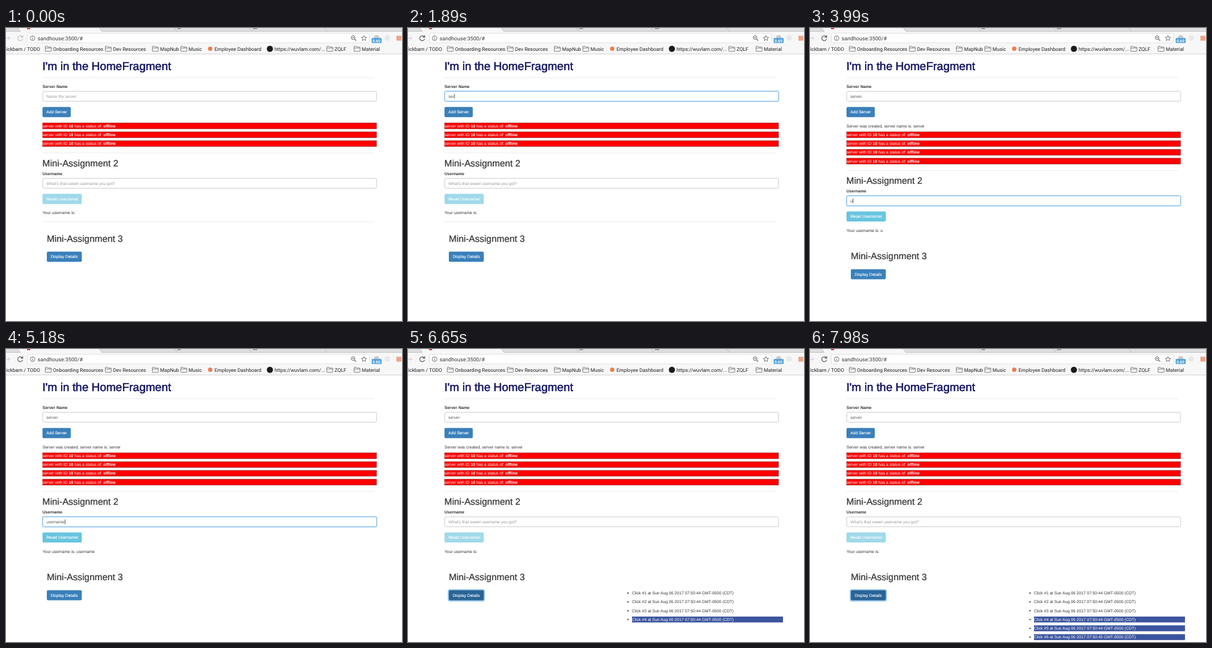
Recreate the animation shown at these times as an HTML page. Size 640 by 474 pixels, loop 8050 ms.

```html
<!DOCTYPE html>
<html lang="en">
<head>
<meta charset="utf-8">
<title>Server form demo</title>
<style>
  html, body { margin: 0; width: 100%; height: 100%; overflow: hidden; background: #fff; }
  svg { display: block; width: 640px; height: 474px; }
  text { font: 6.64px "Liberation Sans", Arial, sans-serif; fill: #333; text-rendering: geometricPrecision; white-space: pre; }
  .chrome text { font: 8.05px Roboto, "Open Sans", sans-serif; fill: #222; }
  .chrome .url { font-size: 8.7px; fill: #333; }
  .chrome .badge { font-size: 6.2px; fill: #fff; font-weight: 700; }
  .bold { font-weight: 700; }
  .title { font-size: 18.5px; fill: #10125f; stroke: #10125f; stroke-width: .5; }
  .head { font-size: 14.95px; stroke: #333; stroke-width: .22; }
  .white { fill: #fff; }
  .btn text { fill: #fff; stroke: #fff; stroke-width: .12; }
  .rule { stroke: #ececec; }
  .bar rect { fill: #f00; stroke: #8c0000; stroke-width: .7; }
  .bar text { fill: #fff; }
  .glow { fill: none; stroke: #66afe9; stroke-opacity: .3; stroke-width: 3; }
</style>
</head>
<body>
<svg id="stage" viewBox="0 0 640 474">
  <defs>
    <path id="folder" d="M.5 8V1.2Q.5.5 1.2.5H4l1 1.3h4.4q.8 0 .8.8V8q0 .7-.8.7H1.2Q.5 8.700.5 8ZM.5 3.300H10.200" fill="none" stroke="#777" stroke-width=".9"/>
  </defs>
  <rect width="640" height="474" fill="#fff"/>

  <g class="chrome" id="chrome">
    <rect width="640" height="42" fill="#f7f7f7"/>
    <path d="M0 0H19L23 5.500H0ZM151 0H640V5.500H155Z" fill="#dedede"/>
    <path d="M0 5.500H23L19 0M151 0L155 5.500H640M272 0L276 5M393 0L397 5M515 0L519 5" fill="none" stroke="#b9b9b9" stroke-width=".8"/>
    <rect x="34" y="0" width="5" height="2" fill="#d8404a"/>
    <path d="M277 1H283M399 1H406" stroke="#666" stroke-width="1.200"/>
    <rect x="34.500" y="8.500" width="553" height="15.500" rx="2" fill="#fff" stroke="#dcdcdc" stroke-width=".8"/>
    <path d="M0 16.500H6M3 13.300L6.200 16.500L3 19.700" fill="none" stroke="#ccc"/>
    <path id="reload" d="M26.300 14.200A4 4 0 1 0 26.900 17.600M27 11.800V14.900H23.800" fill="none" stroke="#5c5c5c" stroke-width="1.200"/>
    <circle cx="43" cy="16.500" r="3.800" fill="none" stroke="#666" stroke-width=".9"/>
    <path d="M43 16V18.700M43 14V15" stroke="#666"/>
    <text class="url" x="51" y="19.600">sandhouse:3500/#</text>
    <circle cx="561" cy="15.500" r="3" fill="none" stroke="#666"/>
    <path d="M563.300 17.800L566 20.500M559.500 15.500H562.500" stroke="#666" stroke-width="1.100"/>
    <path d="M578.500 12L579.700 15L582.900 15.200L580.400 17.200L581.200 20.300L578.500 18.600L575.800 20.300L576.600 17.200L574.100 15.200L577.300 15Z" fill="none" stroke="#666" stroke-width=".9"/>
    <circle cx="599" cy="16" r="4.500" fill="#c9c9c9"/>
    <rect x="591" y="16.300" width="16" height="8" rx="1" fill="#4c9fda"/>
    <text class="badge" x="592.500" y="22.700">0.60</text>
    <circle cx="616" cy="16" r="4.500" fill="#e8e8e8"/>
    <rect x="631" y="12.500" width="8" height="8" fill="#eba58b"/>
    <path d="M0 42H640" stroke="#d2d2d2"/>
    <text x="55" y="36.700" text-anchor="end">Wickbarn / TODO</text>
    <circle cx="330" cy="33.500" r="3.500" fill="#ef7c4a"/>
    <text x="337" y="36.700">Employee Dashboard</text>
    <circle cx="426.500" cy="33.700" r="5" fill="#1b1b1b"/>
    <text x="434" y="36.700">https://wuvlam.com/...</text>
  </g>

  <text class="title" x="58.700" y="67.600">I'm in the HomeFragment</text>
  <path class="rule" d="M59 80.500H595"/>
  <text class="bold" x="59" y="97.200">Server Name</text>
  <g id="serverField" transform="translate(59 102)"></g>
  <g id="addBtn" class="btn" transform="translate(59 127.800)"></g>
  <text id="created" x="59" y="160.700">Server was created, server name is: server</text>
  <g id="bars"></g>

  <g id="lower">
    <path class="rule" d="M59 202H595"/>
    <text class="head" x="58.800" y="223.800">Mini-Assignment 2</text>
    <text class="bold" x="59" y="237.500">Username</text>
    <g id="userField" transform="translate(59 242.800)"></g>
    <g id="resetBtn" class="btn" transform="translate(59 268.300)"></g>
    <text id="echo" x="59" y="301.200"></text>
    <path id="lastRule" class="rule" d="M59 313.500H595"/>
    <text class="head" x="66" y="346">Mini-Assignment 3</text>
    <g id="showBtn" class="btn" transform="translate(66 361.800)"></g>
  </g>
  <g id="clicks"></g>
</svg>

<script>
const LOOP = 8050, STEP = 14.25, SHIFT = 28.4;
const PRIMARY = '#3a80bb', PRESSED = '#2a6496';
const $ = id => document.getElementById(id);

// Times in ms
const serverKeys = [1640, 1750, 1860, 2000, 2130, 2260];
const userKeys = [3950, 4110, 4260, 4410, 4550, 4700, 4850, 5000];
const clickTimes = [6090, 6230, 6440, 6590, 6700, 6880];
const at = { ready: 420, focusServer: 1250, add: 2670, created: 2700, focusUser: 3480, reset: 5530 };

function el(parent, tag, attrs = {}, text = '') {
  const node = document.createElementNS('http://www.w3.org/2000/svg', tag);
  for (const key in attrs) node.setAttribute(key, attrs[key]);
  node.textContent = text;
  return parent.appendChild(node);
}

const show = (node, on) => node.setAttribute('visibility', on ? 'visible' : 'hidden');

function makeField(id, placeholder) {
  const g = $(id);
  const size = { x: .4, y: .4, width: 539.4, height: 16, rx: 2 };
  const glow = el(g, 'rect', { ...size, class: 'glow' });
  const box = el(g, 'rect', { ...size, fill: '#fff', 'stroke-width': .9 });
  const label = el(g, 'text', { x: 6.3, y: 10.8 });
  const caret = el(g, 'rect', { y: 4.6, width: .7, height: 7.6, fill: '#222' });
  return (value, focus, caretOn) => {
    glow.style.opacity = focus;
    box.setAttribute('stroke', focus > .5 ? '#66afe9' : '#c8c8c8');
    label.textContent = value || placeholder;
    label.style.fill = value ? '#555' : '#999';
    caret.setAttribute('x', 6.5 + (value ? label.getComputedTextLength() : 0));
    show(caret, caretOn);
  };
}

function makeButton(id, width, text) {
  const g = $(id);
  const glow = el(g, 'rect', { x: -.3, y: -.3, width: width + .6, height: 17, rx: 2, class: 'glow' });
  glow.style.strokeOpacity = .65;
  const box = el(g, 'rect', { width, height: 16.4, rx: 2 });
  el(g, 'text', { x: 6.3, y: 10.5 }, text);
  return (color, focus) => {
    box.setAttribute('fill', color);
    show(glow, focus);
  };
}

const folders = [
  [63, 'Onboarding Resources'], [160, 'Dev Resources'], [236, 'MapNub'],
  [282, 'Music'], [518, 'ZQLF'], [562, 'Material']
];
for (const [x, name] of folders) {
  el($('chrome'), 'use', { href: '#folder', x, y: 29 });
  el($('chrome'), 'text', { x: x + 13, y: 36.7 }, name);
}

const bars = Array.from({ length: 4 }, (_, i) => {
  const g = el($('bars'), 'g', { class: 'bar', transform: `translate(59 ${153.4 + i * STEP})` });
  el(g, 'rect', { x: .2, y: .4, width: 539.6, height: 9.2 });
  const text = el(g, 'text', { y: 7.3 }, 'server with ID ');
  el(text, 'tspan', { class: 'bold' }, '10');
  el(text, 'tspan', {}, ' has a status of: ');
  el(text, 'tspan', { class: 'bold' }, 'offline');
  return g;
});

const clicks = clickTimes.map((_, i) => {
  const g = el($('clicks'), 'g', { transform: `translate(362 ${394.6 + i * STEP})` });
  const marked = i > 2;
  if (marked) el(g, 'rect', { y: -4.5, width: 244, height: 9.5, fill: '#3b549f' });
  el(g, 'circle', { cx: -6.5, cy: .3, r: 1.1, fill: '#333' });
  el(g, 'text', { y: 2.4, class: marked ? 'white' : '' },
    `Click #${i + 1} at Sun Aug 06 2017 07:50:${i < 5 ? 44 : 45} GMT-0500 (CDT)`);
  return g;
});

const serverField = makeField('serverField', 'Name thy server');
const userField = makeField('userField', "What's that sweet username you got?");
const addBtn = makeButton('addBtn', 45.7, 'Add Server');
const resetBtn = makeButton('resetBtn', 63.5, 'Reset Username!');
const showBtn = makeButton('showBtn', 56.5, 'Display Details');

const typed = (word, keys, t) => word.slice(0, keys.filter(k => k <= t).length);
const within = (t, from, to) => t >= from && t < to;

// Bootstrap-like focus fade of 150 ms on both ends
const focusLevel = (t, from, to) =>
  Math.max(0, Math.min(1, (t - from) / 150, 1 - (t - to) / 150));

function caretOn(t, from, to, keys) {
  if (!within(t, from, to)) return false;
  const last = Math.max(from, ...keys.filter(k => k <= t));
  return (t - last) % 1000 < 500;
}

function render(t) {
  const created = t >= at.created;
  const user = t < at.reset ? typed('username', userKeys, t) : '';
  const clicked = t >= clickTimes[0] - 60;
  const adding = within(t, at.add, at.focusUser);

  $('reload').setAttribute('stroke', t < at.ready ? '#c4c4c4' : '#5c5c5c');
  serverField(typed('server', serverKeys, t), focusLevel(t, at.focusServer, at.add),
    caretOn(t, at.focusServer, at.add, serverKeys));
  addBtn(adding ? PRESSED : PRIMARY, adding);

  show($('created'), created);
  show(bars[3], created);
  $('bars').setAttribute('transform', `translate(0 ${created ? STEP : 0})`);
  $('lower').setAttribute('transform', `translate(0 ${created ? SHIFT : 0})`);
  show($('lastRule'), !created);

  userField(user, focusLevel(t, at.focusUser, at.reset),
    caretOn(t, at.focusUser, at.reset, userKeys));
  resetBtn(user ? '#68c5e0' : '#9fd9ea', false);
  $('echo').textContent = 'Your username is: ' + user;

  showBtn(clicked ? PRESSED : PRIMARY, clicked);
  clicks.forEach((g, i) => show(g, t >= clickTimes[i]));
}

const start = performance.now();
function tick() {
  render((performance.now() - start) % LOOP);
  requestAnimationFrame(tick);
}
tick();
</script>
</body>
</html>
```
